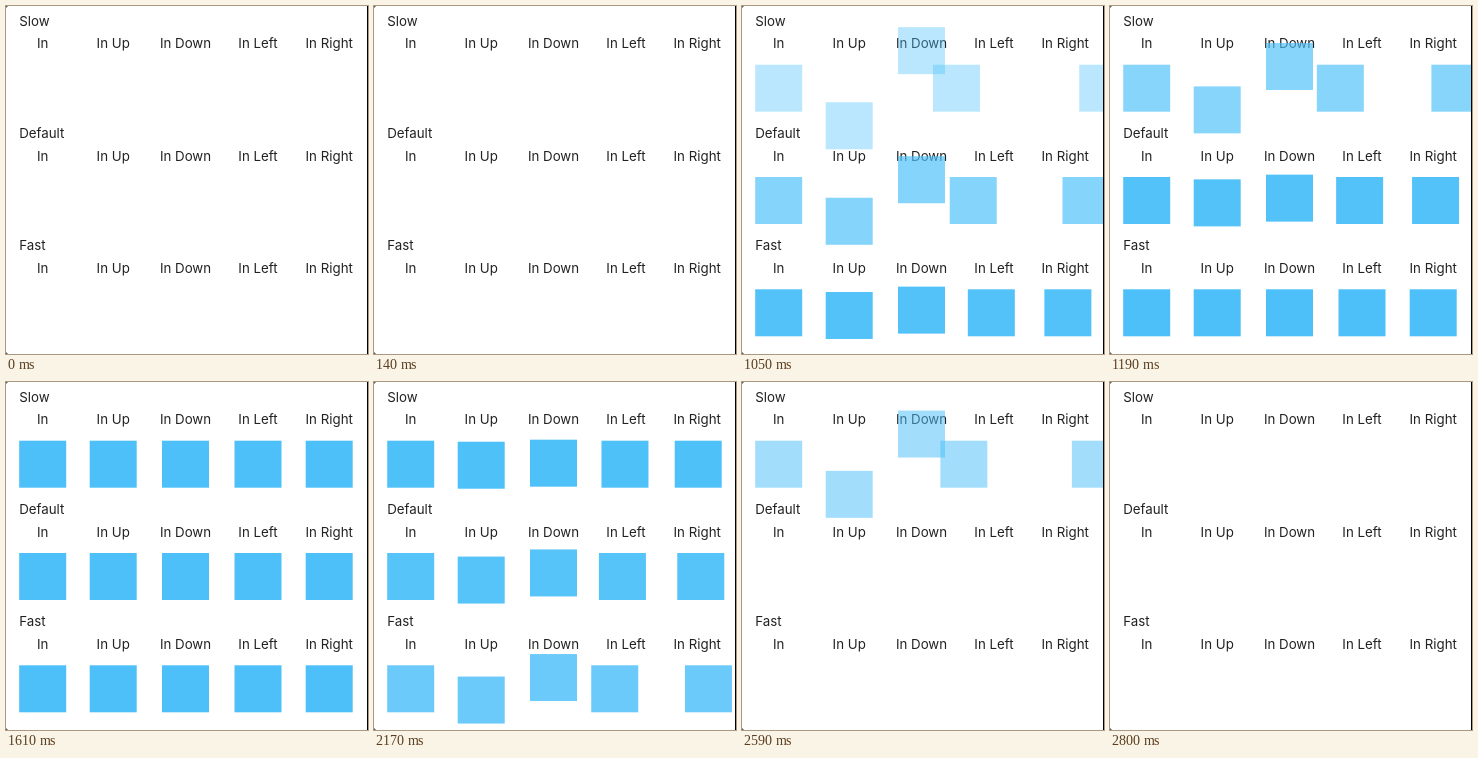
Write an HTML page that moves like this. It is 362x348 px and loops after 3290 ms.

```html
<!DOCTYPE html>
<html lang="en">
<head>
<meta charset="utf-8">
<style>
  html, body { margin: 0; width: 100%; height: 100%; overflow: hidden; background: #fff; }
  svg { display: block; }
  text { font: 13.3px Inter, "Liberation Sans", sans-serif; fill: #222; }
  .label { text-anchor: middle; }
  .box { fill: #4dc0f9; }
</style>
</head>
<body>
<svg id="stage" width="362" height="348" viewBox="0 0 362 348"></svg>
<script>
const LOOP = 3290;
const ENTER_AT = 880;
const LEAVE_AT = 2080;
const TRAVEL = 52;
const SIZE = 47;
const ROW_HEIGHT = 112.3;

const rows = [
  { name: "Slow", duration: 720 },
  { name: "Default", duration: 385 },
  { name: "Fast", duration: 215 }
];
const columns = [
  { name: "In", center: 36.7, dx: 0, dy: 0 },
  { name: "In Up", center: 107.2, dx: 0, dy: 1 },
  { name: "In Down", center: 179.5, dx: 0, dy: -1 },
  { name: "In Left", center: 252, dx: -1, dy: 0 },
  { name: "In Right", center: 323.2, dx: 1, dy: 0 }
];

const stage = document.getElementById("stage");

function add(tag, attributes, content = "") {
  const node = document.createElementNS("http://www.w3.org/2000/svg", tag);
  for (const key in attributes) node.setAttribute(key, attributes[key]);
  node.textContent = content;
  stage.append(node);
  return node;
}

function bezier(x1, y1, x2, y2) {
  const along = (u, a, b) => 3 * (1 - u) ** 2 * u * a + 3 * (1 - u) * u * u * b + u ** 3;
  return x => {
    if (x <= 0) return 0;
    if (x >= 1) return 1;
    let low = 0, high = 1;
    for (let i = 0; i < 24; i++) {
      const mid = (low + high) / 2;
      if (along(mid, x1, x2) < x) low = mid; else high = mid;
    }
    return along(low, y1, y2);
  };
}

const easeEnter = bezier(0.25, 0.12, 0.5, 1);
const easeLeave = bezier(0.45, 0, 0.78, 0.75);

rows.forEach((row, r) => {
  const top = r * ROW_HEIGHT;
  add("text", { x: 13.2, y: top + 19.8 }, row.name);
  columns.forEach(column =>
    add("text", { x: column.center, y: top + 42.3, class: "label" }, column.name));
});

const boxes = rows.flatMap((row, r) => columns.map(column => ({
  row, column,
  node: add("rect", {
    class: "box", width: SIZE, height: SIZE,
    x: column.center - SIZE / 2, y: 58.7 + r * ROW_HEIGHT
  })
})));

// Window edge and its rounded left corners
add("rect", { x: 361, y: 0, width: 1, height: 348, fill: "#000" });
add("path", { d: "M0 0H2L0 2ZM0 348H2L0 346Z", fill: "#555" });

function render(time) {
  for (const { row, column, node } of boxes) {
    const shown = time < LEAVE_AT
      ? easeEnter((time - ENTER_AT) / row.duration)
      : 1 - easeLeave((time - LEAVE_AT) / row.duration);
    const offset = TRAVEL * (1 - shown);
    node.setAttribute("opacity", shown ** 0.75);
    node.setAttribute("transform", `translate(${column.dx * offset} ${column.dy * offset})`);
  }
}

const start = performance.now();
function tick() {
  render((performance.now() - start) % LOOP);
  requestAnimationFrame(tick);
}
tick();
</script>
</body>
</html>
```
